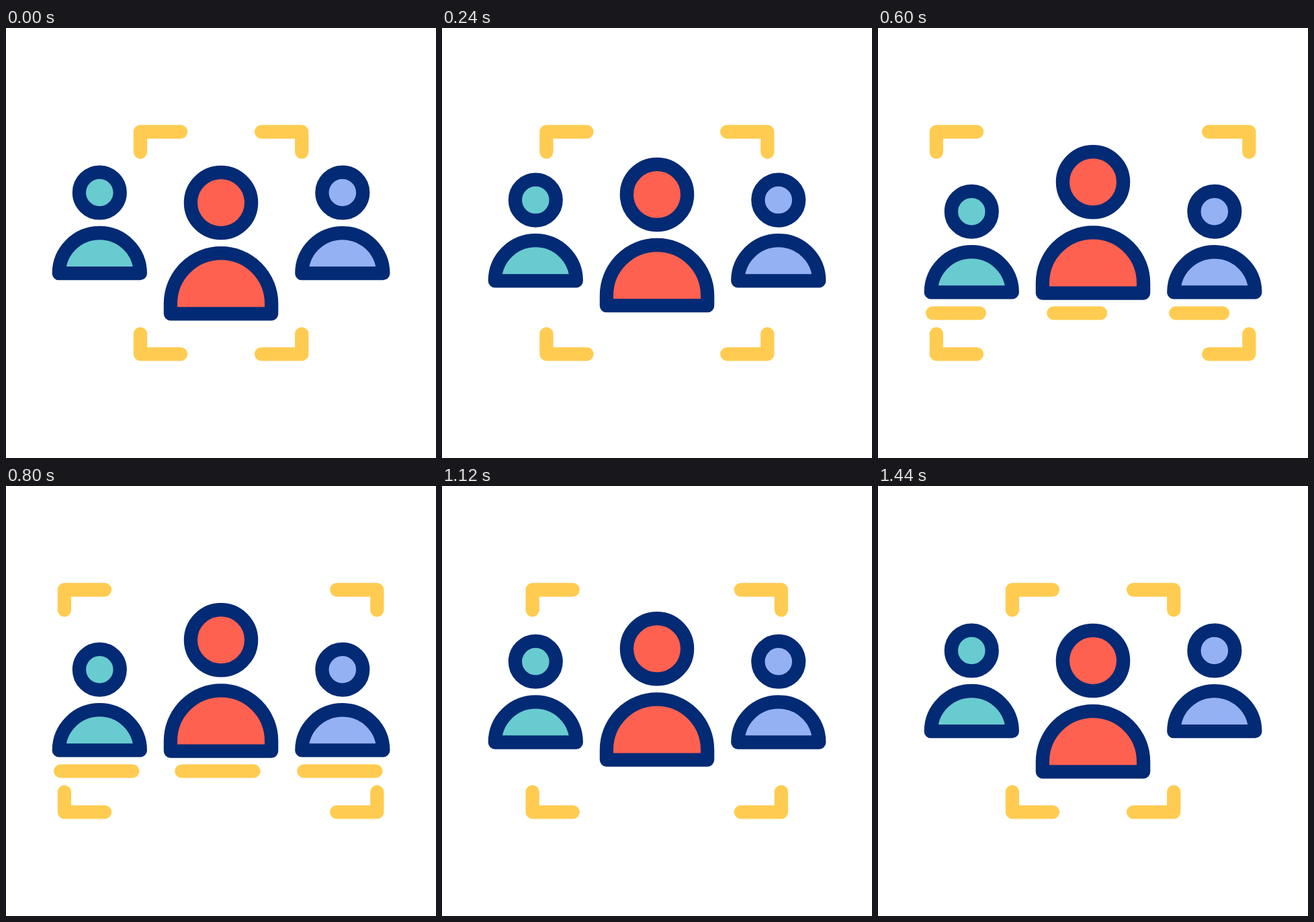
These frames come from a looping animation (640 by 640 pixels, 1.48 s). An HTML page:

```html
<!DOCTYPE html>
<html lang="en">
<head>
<meta charset="utf-8">
<title>Focus group</title>
<style>
  html, body { margin: 0; width: 100%; height: 100%; overflow: hidden; background: #fff; }
  svg { display: block; width: 100%; height: 100%; }
  path, circle { stroke-width: 20.3; stroke-linecap: round; stroke-linejoin: round; }
  .person { stroke: #032a74; }
  .mark { stroke: #ffcc51; fill: none; }
</style>
</head>
<body>
<svg viewBox="0 0 640 640">
  <g class="mark" id="left"><path d="M199.9 184.6V154.5H260M199.9 455.4V485.4H260"/></g>
  <g class="mark" id="right"><path d="M440.2 184.6V154.5H380.1M440.2 455.4V485.4H380.1"/></g>
  <g class="person side" fill="#68cbd0">
    <circle cx="139.3" cy="245" r="30.4"/>
    <path d="M78.8 365.2a60.5 60.2 0 0 1 121 0Z"/>
  </g>
  <g class="person side" fill="#94b1f3">
    <circle cx="500.8" cy="245" r="30.4"/>
    <path d="M440.3 365.2a60.5 60.2 0 0 1 121 0Z"/>
  </g>
  <g class="person" id="lead" fill="#ff6150">
    <circle cx="320" cy="260" r="45.1"/>
    <path d="M244.9 425.3V410.2a75.1 75.1 0 0 1 150.2 0v15.1Z"/>
  </g>
  <path class="mark" id="lines"/>
</svg>
<script>
const LOOP = 1480, STEP = 40;
const SPREAD_IN = [120, 400], SPREAD_OUT = [960, 1440];
const LINE_IN = [400, 760], LINE_OUT = [760, 960];
const LINE_X = [81.2, 261.4, 443.3], LINE_Y = 424.4, LINE_LENGTH = 119.5;

const $ = id => document.getElementById(id);
const sides = document.querySelectorAll('.side');
const shift = (el, x, y) => el.setAttribute('transform', `translate(${x.toFixed(3)} ${y.toFixed(3)})`);

// Cubic easing with flat ends; x1 and x2 set the handle lengths.
function ease(t, [start, end], x1 = 1 / 3, x2 = 2 / 3) {
  const u = Math.min(1, Math.max(0, (t - start) / (end - start)));
  if (u === 0 || u === 1) return u;
  let lo = 0, hi = 1;
  for (let i = 0; i < 24; i++) {
    const s = (lo + hi) / 2, r = 1 - s;
    if (3 * s * r * r * x1 + 3 * s * s * r * x2 + s * s * s < u) lo = s;
    else hi = s;
  }
  return lo * lo * (3 - 2 * lo);
}

function draw(t) {
  const spread = ease(t, SPREAD_IN) - ease(t, SPREAD_OUT, 0.168, 0.525);
  const length = LINE_LENGTH * (ease(t, LINE_IN) - ease(t, LINE_OUT));

  shift($('left'), -113 * spread, 0);
  shift($('right'), 112.1 * spread, 0);
  shift($('lead'), 0, -30.7 * spread);
  sides.forEach(el => shift(el, 0, 28.2 * spread));
  $('lines').setAttribute('d', length > 0.01
    ? LINE_X.map(x => `M${x} ${LINE_Y}h${length.toFixed(3)}`).join('')
    : '');
}

const began = performance.now();
function tick() {
  const t = (performance.now() - began) % LOOP;
  draw(Math.floor(t / STEP) * STEP);
  requestAnimationFrame(tick);
}
tick();
</script>
</body>
</html>
```
